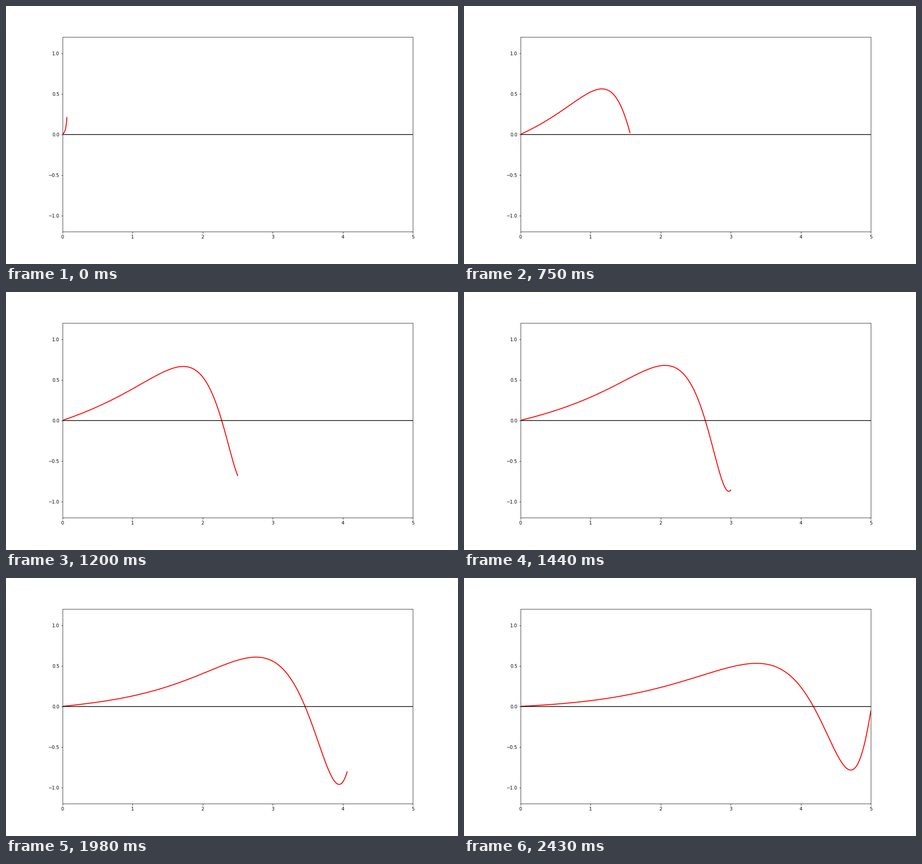
Write a matplotlib script that moves like this. It is 990 px wide and 566 px high and loops after 2.46 s.

```python
import numpy as np
import matplotlib.pyplot as plt
from matplotlib.animation import FuncAnimation

W, H, DPI = 990, 566, 72
FRAMES, INTERVAL = 82, 30
STEP = 1 / 16        # the visible end of the wave advances in these steps
PACE = 60 / 61       # steps per frame
SWAY = 1.15          # angular speed at which the amplitude swells and fades


def front(i):
    """Right end of the drawn wave."""
    return STEP * max(1, np.ceil(i * PACE))


def wave_height(x, t, end):
    """Chirp that tightens towards its end and crosses zero at `node`."""
    u = t - 3.1
    node = 2.729 + .74 * u + .006 * u**3
    rate = 1.66 + .1 * np.cos(np.pi * t)
    pole = node * (1 + rate / np.pi)
    phase = rate * x / (pole - x)

    base = .4 + .22 * np.cos(SWAY * (t - 2.2))
    gain = .37 + .38 * np.cos(SWAY * (t - 4.4))
    amplitude = base + gain * (x / end) ** (3.5 - .4 * t)
    return amplitude * np.sin(phase)


fig = plt.figure(figsize=(W / DPI, H / DPI), dpi=DPI, facecolor="white")
fig.subplots_adjust(left=.125, right=.9, bottom=.125, top=.88)
ax = fig.add_subplot(xlim=(0, 5), ylim=(-1.2, 1.2))
ax.set_yticks([-1, -.5, 0, .5, 1])
wave, = ax.plot([], [], color="red", lw=2)
ax.axhline(0, color="black", lw=1.5, zorder=2.2)


def draw(i):
    end = front(i)
    x = np.linspace(0, end, 400)
    wave.set_data(x, wave_height(x, STEP * (i * PACE + .4), end))
    return wave,


anim = FuncAnimation(fig, draw, frames=FRAMES, interval=INTERVAL,
                     repeat=True, repeat_delay=0)
plt.show()
```
